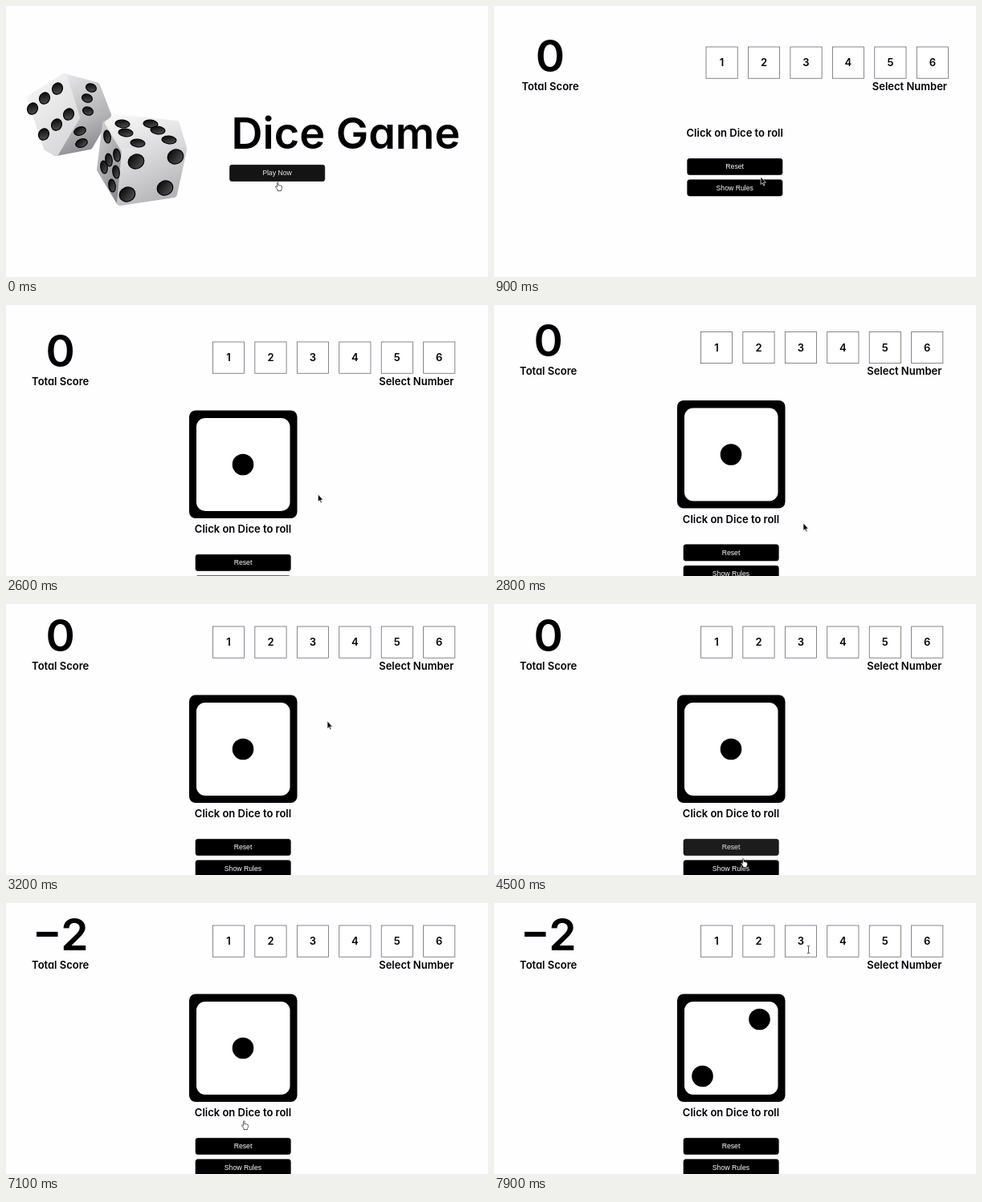
An HTML page that plays this animation: 600 px wide and 338 px high, repeating every 8 s.

```html
<!DOCTYPE html>
<html lang="en">
<head>
<meta charset="utf-8">
<title>Dice Game</title>
<style>
  html, body { margin: 0; height: 100%; overflow: hidden; background: #fefdff; }
  svg { display: block; width: 600px; height: 338px; }
  text { font: 600 13px Inter, sans-serif; font-feature-settings: "cv11"; text-anchor: middle; }
  .title { font-size: 54px; }
  .score { font-size: 55px; }
  .label { font: 8.7px "Liberation Sans", sans-serif; }
</style>
</head>
<body>
<svg id="stage" viewBox="0 0 600 338"></svg>
<script>
const LOOP = 8000, TICK = 100;
const stage = document.getElementById('stage');

// time, x, y, shape; "hold" keeps the previous place until that time
const cursorPath = [
  [0, 335, 219, 'hand'], [400, 335, 219, 'hand'], [500, 336, 218, 'arrow'], [900, 332, 213, 'arrow'],
  [1100, 336, 218, 'hand', 'hold'], [1600, 359, 218, 'hand', 'hold'],
  [2100, 390, 218, 'arrow', 'hold'], [2500, 390, 218, 'arrow'], [2800, 385, 272, 'arrow'],
  [3200, 400, 146, 'arrow', 'hold'], [3700, 389, 146, 'arrow', 'hold'],
  [4100, 389, 146, 'arrow'], [4500, 307, 317, 'hand'], [4700, 307, 312, 'hand', 'hold'],
  [4800, 307, 307, 'hand'], [5200, 400, 180, 'arrow', 'hold'], [5300, 494.5, 54, 'arrow'],
  [5500, 494.5, 44, 'arrow', 'hold'], [6300, 302, 286, 'arrow', 'hold'],
  [6800, 302, 286, 'arrow'], [6900, 296, 225, 'hand'], [7000, 296, 225, 'hand'],
  [7200, 290, 317, 'arrow'], [7400, 290, 317, 'arrow', 'hold'], [7600, 280, 317, 'arrow'],
  [7900, 391.5, 53, 'beam', 'hold'],
];
const scrollPath = [[0, 0], [2500, 0], [2600, 5], [2700, 12], [2800, 17.5], [2900, 22], [3200, 23, 'hold']];

const lerp = (a, b, p) => a + (b - a) * p;
const clamp = v => Math.min(1, Math.max(0, v));

function track(path, t) {
  const next = path.findIndex(key => key[0] > t);
  const a = path.at(next < 0 ? -1 : next - 1), b = path[next];
  if (!b || b.includes('hold')) return a.slice(1);
  const p = (t - a[0]) / (b[0] - a[0]);
  return a.slice(1).map((v, i) => typeof v === 'number' ? lerp(v, b[i + 1], p) : v);
}

const rect = (x, y, w, h, fill, more = '') =>
  `<rect x="${x}" y="${y}" width="${w}" height="${h}" fill="${fill}" ${more}/>`;
const circle = (x, y, r) => `<circle cx="${x}" cy="${y}" r="${r}"/>`;
const text = (x, y, s, cls = '', fill = '#000') =>
  `<text x="${x}" y="${y}" class="${cls}" fill="${fill}">${s}</text>`;

function button(x, y, s, hover = 0) {
  const grey = v => `rgb(${v},${v},${v})`, level = Math.round(255 * hover);
  return rect(x - 59, y + .3, 118.3, 20.2, grey(level), 'rx="2.8" stroke="#000" stroke-width=".6"')
    + text(x, y + 13.3, s, 'label', grey(255 - level));
}

// Fades in with an ease-in curve while the pointer is over a button
const hoverLevel = (t, from, to) => t < to ? clamp((t - from) / 260) ** 1.9 : 0;

const face = (points, fill) =>
  `<polygon points="${points}" fill="url(#${fill})" stroke="url(#${fill})" stroke-width="8" stroke-linejoin="round"/>`;
const spots = (rx, ry, angle, list) => list.map(([x, y]) =>
  `<ellipse rx="${rx}" ry="${ry}" transform="translate(${x} ${y}) rotate(${angle})" fill="url(#spot)" stroke="#000" stroke-width="1.2"/>`).join('');
const shade = (id, from, to) =>
  `<linearGradient id="${id}" x2=".6" y2="1"><stop stop-color="${from}"/><stop offset="1" stop-color="${to}"/></linearGradient>`;

const diceArt = `<defs>
  ${shade('light', '#f7f7f7', '#d9d9db')}${shade('mid', '#e6e6e8', '#b5b5b8')}
  ${shade('dark', '#cfcfd2', '#8b8b8f')}${shade('spot', '#000', '#4c4c4c')}</defs>`
  + face('72,88 113,99 127,136 86,140', 'mid')
  + face('86,140 127,136 104,175 62,183', 'dark')
  + face('30,115 72,88 88,139 62,183 51,177', 'light')
  + spots(6.3, 7.3, 25, [[64, 103], [48, 115], [33, 128], [78, 135], [63, 148], [47, 160]])
  + spots(6.6, 5, 20, [[106, 102], [101, 115], [102, 131]])
  + spots(7.5, 5, -20, [[92, 156], [94, 171]])
  + face('124,147 146,180 141,244 117,204', 'dark')
  + face('127,146 137,139 212,147 221,177 148,181', 'light')
  + face('148,181 221,180 209,235 142,245', 'mid')
  + spots(9, 4.8, 5, [[145, 147], [180, 147], [149, 158], [189, 155], [164, 171], [203, 167]])
  + spots(4.2, 8, -8, [[126, 163], [138, 186], [128, 192], [122, 201], [137, 207], [132, 224]])
  + spots(10, 8.8, -25, [[162, 194], [211, 188], [151, 235], [198, 227]]);

const home = t => diceArt + text(423, 178, 'Dice Game', 'title')
  + button(337.5, 198, 'Play Now', hoverLevel(t, -68, 500));

const pips = { 1: [[295, 204]], 2: [[330.5, 168], [259.5, 239]] };
const die = value => rect(228, 136.5, 134.5, 134.5, '#000', 'rx="8"')
  + rect(237, 146, 116.5, 116, '#fff', 'rx="11"')
  + pips[value].map(([x, y]) => circle(x, y, 13.3)).join('');

function game(t) {
  const loaded = t >= 1100, chosen = t >= 5800 && t < 7000 ? 5 : 0;
  const left = loaded ? 67.7 : 70, right = loaded ? 257.4 : 264, mid = loaded ? 295 : 299.7;
  const drop = loaded ? 126 : 0;
  let out = text(left, 81.5, t < 7000 ? '0' : '−2', 'score') + text(left, 104.7, 'Total Score');
  for (let n = 1; n <= 6; n++) {
    const x = right + 52.45 * (n - 1), on = n === chosen;
    out += rect(x, 51, 39.2, 39.2, on ? '#000' : '#fff', 'stroke="#555" stroke-width=".7"')
      + text(x + 19.6, 75.3, n, '', on ? '#fff' : '#000');
  }
  out += text(right + 253.4, 104.7, 'Select Number');
  if (loaded) out += die(t < 7400 ? 1 : 2);
  out += text(mid, 163 + drop, 'Click on Dice to roll')
    + button(mid, 190 + drop, 'Reset', hoverLevel(t, 4418, 5200))
    + button(mid, 216.4 + drop, 'Show Rules');
  return `<g transform="translate(0 ${-track(scrollPath, t)[0]})">${out}</g>`;
}

const cursorShapes = {
  arrow: '<path d="M0 0V9.5L2.1 7.6L3.6 11L5 10.4L3.6 7.1H6.4Z" fill="#000" stroke="#fff" stroke-width=".7"/>',
  hand: '<path d="M3 11.5V10L.6 6.8Q.3 5.5 1.5 5.8L2.6 6.8V1.2Q3.3 0 4 1.2V4.6Q5 4 5.6 4.8Q6.6 4.4 7 5.2Q8.4 5 8.4 6.2V8.5L7.6 10.2V11.5Z" fill="#fff" stroke="#222" stroke-width=".7"/>',
  beam: '<path d="M-1.6 .4Q0 .4 0 1.5Q0 .4 1.6 .4M0 1.5V8.7M-1.6 9.8Q0 9.8 0 8.7Q0 9.8 1.6 9.8" fill="none" stroke="#222" stroke-width=".8"/>',
};
function cursor(t) {
  const [x, y, shape] = track(cursorPath, t);
  return `<g transform="translate(${x} ${y})">${cursorShapes[shape]}</g>`;
}

let shown = -1;
function draw(now) {
  const t = Math.floor(now % LOOP / TICK) * TICK;
  if (t !== shown) {
    stage.innerHTML = (t < 500 ? home(t) : game(t)) + cursor(t);
    shown = t;
  }
  requestAnimationFrame(draw);
}
draw(0);
</script>
</body>
</html>
```
